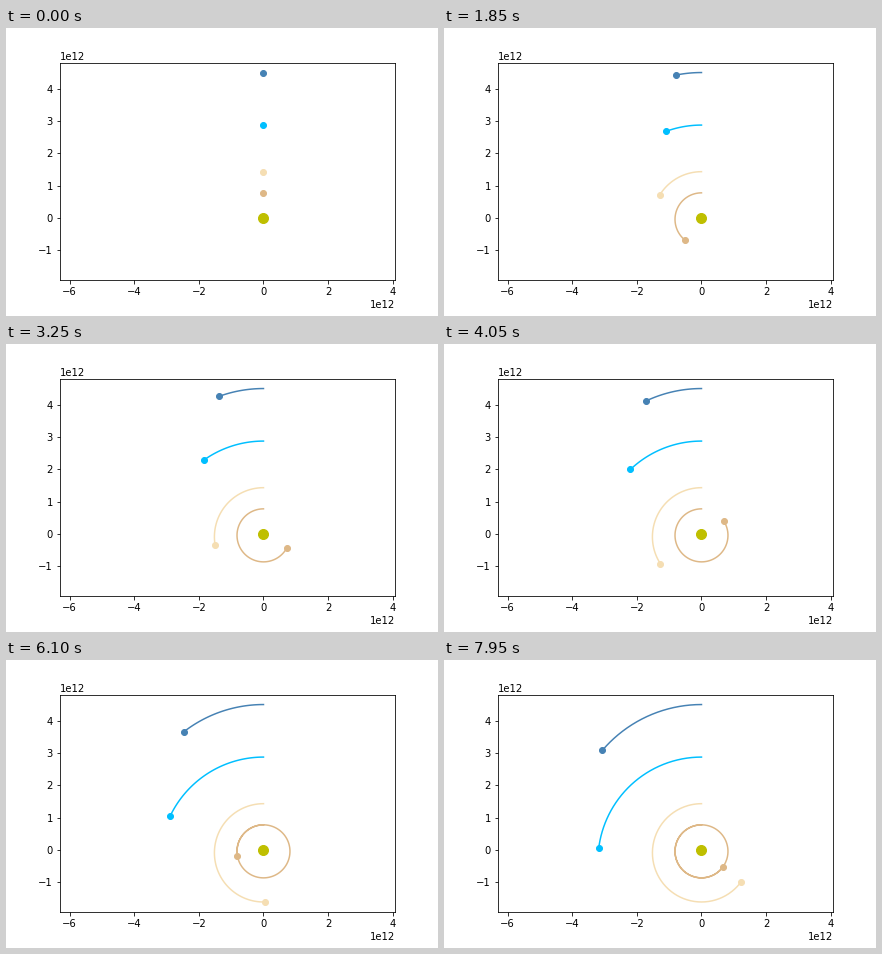
A matplotlib script that plays this animation: 432x288 px, repeating every 8 s.

```python
import numpy as np
import matplotlib.pyplot as plt
from matplotlib.animation import FuncAnimation

FRAMES, STEP_MS = 160, 50
UNIT = 1e12
# Jupiter's period in frames and semi-major axis set the time scale
T_REF, A_REF = 95.8, 0.82

# start distance (1e12 m), eccentricity (negative: starts at aphelion), colour
PLANETS = [
    (0.7795, 0.050, "burlywood"),
    (1.4345, 0.057, "wheat"),
    (2.877, 0.108, "deepskyblue"),
    (4.503, -0.107, "steelblue"),
]


def orbit(r0, ecc):
    """Kepler orbit around the sun, starting straight up, counter-clockwise."""
    a = r0 / (1 - ecc)
    period = T_REF * (a / A_REF) ** 1.5
    mean = 2 * np.pi * np.arange(FRAMES) / period
    anom = mean.copy()
    for _ in range(30):
        anom = mean + ecc * np.sin(anom)
    x = -a * np.sqrt(1 - ecc ** 2) * np.sin(anom)
    y = a * (np.cos(anom) - ecc)
    return x * UNIT, y * UNIT


plt.rcParams["font.family"] = "DejaVu Sans"
plt.rcParams["font.size"] = 10
fig = plt.figure(figsize=(6, 4), dpi=72, facecolor="white")
ax = fig.add_axes([0.125, 0.125, 0.775, 0.755])
ax.set_xlim(-6.298 * UNIT, 4.064 * UNIT)
ax.set_ylim(-1.918 * UNIT, 4.812 * UNIT)

ax.plot(0, 0, "yo", ms=10)
bodies = []
for r0, ecc, color in PLANETS:
    trail, = ax.plot([], [], color=color, lw=1.5)
    dot, = ax.plot([], [], "o", color=color, ms=6)
    bodies.append((orbit(r0, ecc), trail, dot))


def draw(k):
    for (x, y), trail, dot in bodies:
        trail.set_data(x[:k + 1], y[:k + 1])
        dot.set_data([x[k]], [y[k]])
    return [line for body in bodies for line in body[1:]]


anim = FuncAnimation(fig, draw, frames=FRAMES, interval=STEP_MS, repeat=True,
                     repeat_delay=0, init_func=lambda: draw(0))
plt.show()
```
